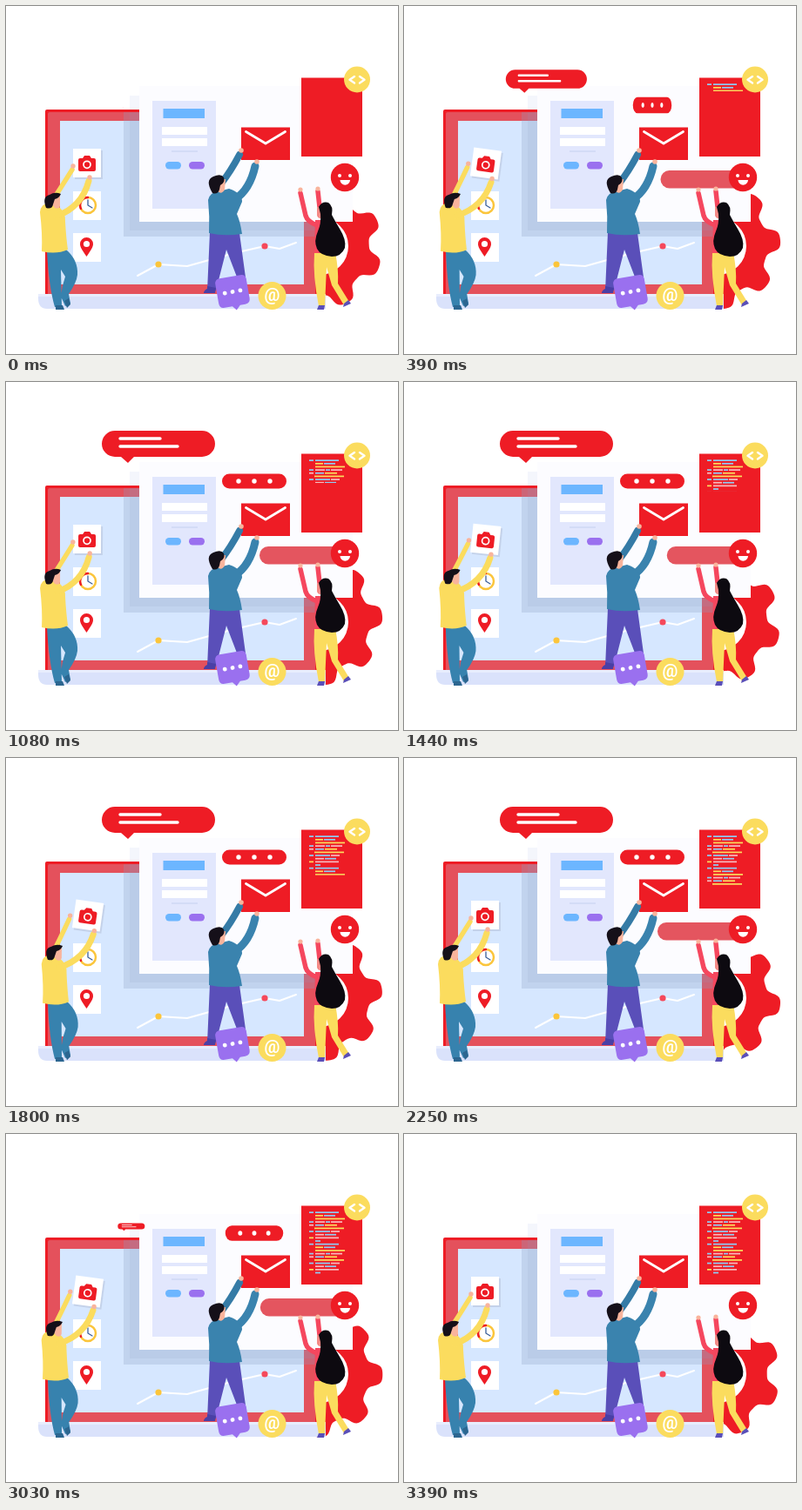
Write an HTML page that moves like this. It is 450 px wide and 400 px high and loops after 3420 ms.

```html
<!DOCTYPE html>
<html lang="en">
<head>
<meta charset="utf-8">
<style>
html, body { margin: 0; width: 100%; height: 100%; overflow: hidden; background: #fff; }
svg { display: block; }
.line { fill: none; stroke-linecap: round; stroke-linejoin: round; }
</style>
</head>
<body>
<svg width="450" height="400" viewBox="0 0 450 400">
  <defs>
    <clipPath id="laptopArea"><path d="M48 122H355V331H48Z"/></clipPath>
    <clipPath id="codeArea"><rect id="codeWipe" x="339" y="83" width="70" height="0"/></clipPath>
  </defs>

  <path id="gear" fill="#ee1c25" fill-rule="evenodd"/>

  <g id="laptop">
    <path d="M47 119H365Q367 119 367 121V331H45V121Q45 119 47 119Z" fill="#ee1c25"/>
    <path d="M50 122H355V331H48V124Q48 122 50 122Z" fill="#e4515c"/>
    <path d="M62 132H342V320H62Z" fill="#d6e7ff"/>
    <path d="M37 331H367V348H47Q37 348 37 336Z" fill="#dae2fb"/>
    <path d="M37 331H367V334H37Z" fill="#e8edfd"/>
    <path class="line" d="M151 310L175 297L208 299L262 284L297 276L314 279L333 272" stroke="#fff" stroke-width="2"/>
    <circle cx="175" cy="297" r="3.6" fill="#fbc53b"/>
    <circle cx="297" cy="276" r="3.6" fill="#f5495b"/>
  </g>

  <g id="window">
    <path d="M142 103H153V119H142Z" fill="#f4f6fc"/>
    <path d="M135 112H388V265H135Z" fill="#8a9dc0" opacity=".27" clip-path="url(#laptopArea)"/>
    <path d="M142 103H380V258H142Z" fill="#8a9dc0" opacity=".13" clip-path="url(#laptopArea)"/>
    <path d="M153 92H398V248H153Z" fill="#fcfcff"/>
    <path d="M168 109H241V233H168Z" fill="#e2e7fd"/>
    <path d="M180.500 118H228V129H180.500Z" fill="#6cb6ff"/>
    <path d="M179 139H231V148H179ZM179 152H231V161H179Z" fill="#fff"/>
    <path d="M190 167H220" stroke="#c5d0f0"/>
    <rect x="183" y="179" width="18" height="8.500" rx="4.200" fill="#6cb6ff"/>
    <rect x="210" y="179" width="18" height="8.500" rx="4.200" fill="#9a70ef"/>
  </g>

  <g id="bubble">
    <path d="M125 56H225A15 15 0 0 1 225 86H147L140 93L132 86H125A15 15 0 0 1 125 56Z" fill="#ee1c25"/>
    <path class="line" d="M131 65H177M131 74H197" stroke="#fff" stroke-width="3.400"/>
  </g>

  <g id="dots">
    <rect x="-37" y="-8.500" width="74" height="17" rx="8.500" fill="#ee1c25"/>
    <g fill="#fff"><circle cx="-18" r="2.700"/><circle r="2.700"/><circle cx="18" r="2.700"/></g>
  </g>

  <path d="M270 139.500H326V177H270Z" fill="#ee1c25"/>
  <path class="line" d="M275.500 144.500L298 158L320.500 144.500" stroke="#fff" stroke-width="2.800"/>

  <path d="M339 82.500H409V173H339Z" fill="#ee1c25"/>
  <g id="code" clip-path="url(#codeArea)"></g>
  <circle cx="403" cy="84.500" r="15" fill="#fbdc5e"/>
  <path class="line" d="M400 81L394.500 84.800L400 88.500M406 81L411.500 84.800L406 88.500" stroke="#fff" stroke-width="2.400"/>

  <rect id="bar" y="189" height="20.500" rx="10" fill="#e4555f"/>
  <circle cx="389" cy="197" r="16.200" fill="#ee1c25"/>
  <circle cx="383" cy="195" r="2" fill="#fff"/>
  <circle cx="395" cy="195" r="2" fill="#fff"/>
  <path d="M383.500 200H395A5.700 5.700 0 0 1 383.500 200Z" fill="#fff"/>

  <g id="icons">
    <path d="M77 213H109V246H77ZM77 261H109V294H77Z" fill="#fff"/>
    <circle cx="94" cy="229" r="9" fill="#fff" stroke="#fbc53b" stroke-width="2.500"/>
    <path class="line" d="M86 233A9 9 0 0 1 94 220" stroke="#ee1c25" stroke-width="2.500"/>
    <path class="line" d="M94 223V229L99 232" stroke="#3a5f9a" stroke-width="1.300"/>
    <path d="M92.500 288C87 280 85 277 85 273.500A7.500 7.500 0 0 1 100 273.500C100 277 98 280 92.500 288Z" fill="#ee1c25"/>
    <circle cx="92.500" cy="273.500" r="3.600" fill="#fff"/>
    <g id="card">
      <path d="M79 166H111V199H79Z" fill="#b9c5dc" opacity=".6"/>
      <path d="M77 164H109V197H77Z" fill="#fff"/>
      <path d="M88 175L90 172H96L98 175H101Q103 175 103 177V188Q103 190 101 190H85Q83 190 83 188V177Q83 175 85 175Z" fill="#ee1c25"/>
      <circle cx="93" cy="182.300" r="4" fill="#ee1c25" stroke="#fff" stroke-width="1.700"/>
    </g>
  </g>

  <g id="lifter">
    <path d="M47 281L69 280Q83 292 82 309Q81 318 72 331L74 342L68 345L63 334Q64 322 68 311L63 303L64 346H56Q49 322 47 281Z" fill="#3782ae"/>
    <path d="M57 344L65 344L67 349H57ZM67 339L72 336L74 343L70 347Z" fill="#2c6690"/>
    <g id="torso">
      <path class="line" id="farArm" stroke="#fbdc5e" stroke-width="5.500"/>
      <path d="M39 237Q40 227 49 227L60 230Q69 238 68 248Q69 266 71 280Q58 286 41 282Q42 262 39 237Z" fill="#fbdc5e"/>
      <path class="line" id="nearArm" stroke="#fbdc5e" stroke-width="7"/>
      <path d="M53 220L62 218L62 230Q61 234 56 232L52 227Z" fill="#f9b49c"/>
      <path d="M46 232Q41 219 50 217Q56 213 63 216Q61 221 56 222L54 228Q53 234 46 232Z" fill="#151019"/>
      <circle id="farHand" r="2.700" fill="#f9b49c"/>
      <circle id="nearHand" r="2.700" fill="#f9b49c"/>
    </g>
  </g>

  <g id="presenter">
    <path d="M234 260L268 261L275 312L266 314L253 280L241 327L231 328Z" fill="#5a4fb9"/>
    <path d="M231 322L241 324L240 330H227Q227 327 231 325ZM266 312H275L276 320H267Z" fill="#4a3fa6"/>
    <path class="line" d="M247 204Q258 190 268 171" stroke="#357ba6" stroke-width="8"/>
    <path class="line" d="M263 222Q280 211 286 184" stroke="#3a83ae" stroke-width="9"/>
    <path d="M232 223Q234 214 244 213L256 210Q271 215 271 225L265 239Q269 248 271 262Q250 265 233 261Q234 242 232 223Z" fill="#3a83ae"/>
    <path d="M243 200L252 199L251 211Q247 218 242 212Z" fill="#f9b49c"/>
    <path d="M237 215Q228 200 238 196Q247 192 250 197Q252 203 246 206L245 211Q243 217 237 215Z" fill="#151019"/>
    <circle cx="270" cy="166" r="2.800" fill="#f9b49c"/>
    <circle cx="288" cy="179" r="2.800" fill="#f9b49c"/>
  </g>

  <g transform="rotate(-10 260 328)">
    <path d="M248 311H272Q278 311 278 317V339Q278 345 272 345H266L261 350L257 345H248Q242 345 242 339V317Q242 311 248 311Z" fill="#9a70ef"/>
    <g fill="#fff"><circle cx="251" cy="328.500" r="2.400"/><circle cx="260" cy="328.500" r="2.400"/><circle cx="269" cy="328.500" r="2.400"/></g>
  </g>
  <circle cx="305.500" cy="333" r="16" fill="#fbdc5e"/>
  <text x="305.500" y="339" text-anchor="middle" font-family="Roboto, sans-serif" font-weight="700" font-size="20" fill="#fff">@</text>

  <g id="helper">
    <path d="M354 284L378 283Q382 304 381 319L394 340L388 344L374 321L368 300L366 345H359Q352 310 354 284Z" fill="#fbdc5e"/>
    <path d="M359 344H366L365 349H357ZM388 342L393 338L396 342L387 346Z" fill="#5a4fb9"/>
    <path class="line" d="M357 252Q346 248 344 241L338 215M361 240L358 213" stroke="#f5475e" stroke-width="5.500"/>
    <path d="M355 246H370V262L367 284H354Z" fill="#f5475e"/>
    <circle cx="338" cy="211" r="2.600" fill="#f9b49c"/>
    <circle cx="358" cy="210" r="2.600" fill="#f9b49c"/>
    <path d="M357 231H367V244Q359 246 357 241Z" fill="#f58a86"/>
    <path d="M359 231Q363 224 370 226Q376 230 374 240Q377 246 383 256Q391 269 389 278Q385 288 374 288Q361 287 357 279Q353 270 358 259Q362 250 361 239Z" fill="#0d0a10"/>
  </g>
</svg>
<script>
const LOOP = 3420;
const el = id => document.getElementById(id);
const set = (id, attrs) => { for (const k in attrs) el(id).setAttribute(k, attrs[k]); };
const ramp = (t, from, to) => Math.min(1, Math.max(0, (t - from) / (to - from)));
const outCubic = u => 1 - (1 - u) ** 3;
const inOut = u => (1 - Math.cos(Math.PI * u)) / 2;
const mix = (a, b, k) => a + (b - a) * k;

// Cog: flattened wave around a circle, with a round hole
function cogPath(angle) {
  let d = '';
  for (let i = 0; i < 240; i++) {
    const a = i * Math.PI / 120;
    const r = 64.5 + 7.8 * Math.tanh(2 * Math.cos(8 * a)) / Math.tanh(2);
    const b = a + angle * Math.PI / 180;
    d += (i ? 'L' : 'M') + (360 + r * Math.cos(b)).toFixed(2) + ' ' + (276 + r * Math.sin(b)).toFixed(2);
  }
  return d + 'ZM393 276A33 33 0 1 0 327 276A33 33 0 1 0 393 276Z';
}

// Code rows: [offset, length, colour] segments, repeated down the panel
const blue = '#8fccf5', pale = '#f8b9bd', gold = '#fbdc5e';
const rows = [
  [[0, 5, blue], [7, 27, blue]],
  [[7, 9, gold], [17, 13, blue]],
  [[7, 34, gold]],
  [[0, 5, blue], [7, 11, pale], [19, 5, blue], [25, 13, pale]],
  [[0, 5, pale], [7, 10, blue], [18, 14, gold]],
  [[6, 34, gold]],
  [[0, 5, blue], [7, 17, blue], [25, 10, pale]],
  [[7, 10, pale], [18, 13, blue]],
  [[0, 5, gold], [7, 27, pale]],
  [[7, 6, blue]]
];
el('code').innerHTML = Array.from({ length: 20 }, (_, i) =>
  rows[i % rows.length].map(([x, w, c]) =>
    `<rect x="${348 + x}" y="${89.3 + i * 3.65}" width="${w}" height="1.7" fill="${c}"/>`).join('')).join('');

function draw(t) {
  set('gear', { d: cogPath(20 - 225 * t / LOOP) });
  set('codeWipe', { height: mix(4.7, 79, ramp(t, 0, 2850)) });

  const grow = outCubic(ramp(t, 0, 1140)) * (1 - ramp(t, 2270, 3270));
  set('bubble', { transform: `translate(134 117) scale(${grow}) translate(-134 -117)` });

  const wide = inOut(ramp(t, 120, 600)) * (1 - inOut(ramp(t, 2940, 3380)));
  const tall = wide ? 1 + 0.08 * Math.sin(Math.PI * wide) : 0;
  set('dots', { transform: `translate(285 114) scale(${wide} ${tall})` });

  const half = t % (LOOP / 2);
  const reach = 98 * outCubic(ramp(half, 90, 540)) * (1 - ramp(half, 1230, 1670) ** 3);
  set('bar', { x: 389 - reach, width: reach + 12 });

  const p = t % (LOOP / 3) / (LOOP / 3);
  const sway = inOut(ramp(p, 0, 0.4) - ramp(p, 0.6, 1));
  set('card', { transform: `translate(${sway} ${sway * 0.5}) rotate(${8 * sway} 93 181)` });
  set('lifter', { transform: `rotate(${0.9 * sway} 62 348)` });
  const farX = mix(76, 70, sway), farY = mix(188, 185, sway);
  const nearX = mix(95, 98, sway), nearY = mix(201, 202, sway);
  set('farArm', { d: `M48 232Q${mix(61, 58, sway)} 212 ${farX} ${farY}` });
  set('nearArm', { d: `M59 241Q${mix(87, 89, sway)} 231 ${nearX} ${nearY}` });
  set('farHand', { cx: farX + 1, cy: farY - 4 });
  set('nearHand', { cx: nearX + 1, cy: nearY - 4 });
}

function tick() {
  draw(performance.now() % LOOP);
  requestAnimationFrame(tick);
}
tick();
</script>
</body>
</html>
```
